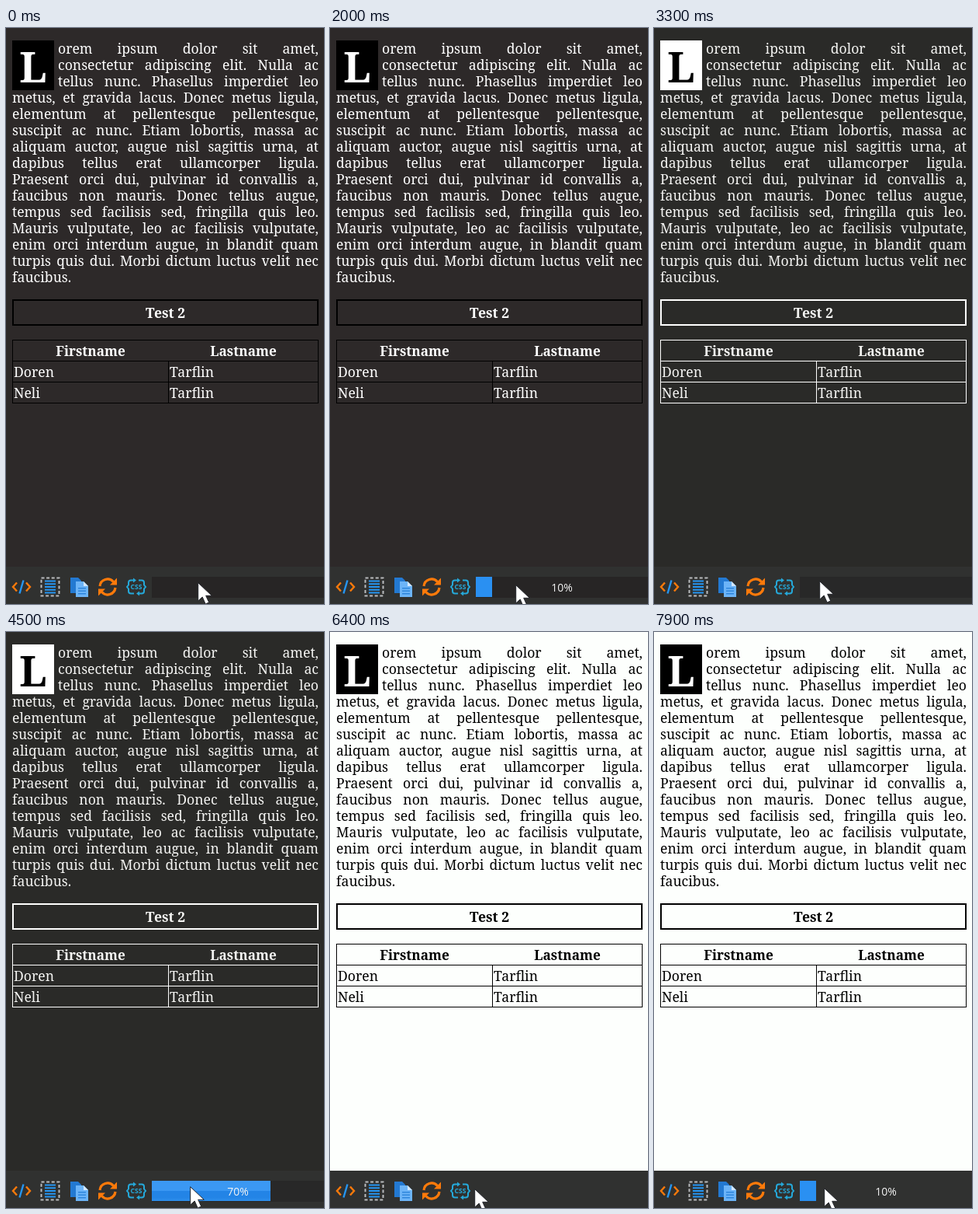
An HTML page that plays this animation: 410x741 px, repeating every 8000 ms.

```html
<!DOCTYPE html>
<html lang="en">
<head>
<meta charset="utf-8">
<title>Style reload</title>
<style>
html, body { margin: 0; width: 100%; height: 100%; overflow: hidden; }
#stage {
  position: relative; width: 410px; height: 741px; overflow: hidden;
  background: var(--bg); color: var(--ink);
  font: 17.6px/21px "Noto Serif", serif;
}
.dark  { --bg: #2d2929; --ink: #fff; --line: #000; --cap: #000; --capInk: #fff; --trough: #272525; }
.slate { --bg: #2a2a28; --ink: #f4f4f2; --line: #fff; --cap: #fff; --capInk: #000; --trough: #282828; }
.light { --bg: #fdfffd; --ink: #000; --line: #000; --cap: #000; --capInk: #fff; --trough: transparent; }
#stage > * { position: absolute; }
.row { right: 7px; white-space: nowrap; text-align: justify; text-align-last: justify; }
.row:last-of-type { text-align-last: left; }
.cap {
  left: 8px; top: 16px; width: 54px; height: 64px;
  background: var(--cap); color: var(--capInk);
  font: bold 54px/66px "Noto Serif", serif; text-align: center;
}
.box { box-sizing: border-box; left: 8px; width: 395px; }
.title {
  top: 349px; height: 34px; border: 2px solid var(--line);
  font-weight: bold; line-height: 31px; text-align: center;
}
.table {
  top: 401px; height: 82px; display: grid;
  grid-template: repeat(3, 26px) / 200px 192px; gap: 1px;
  border: 1px solid var(--line); background: var(--line);
}
.table div { background: var(--bg); padding-left: 1px; line-height: 27px; }
.table .th { padding: 0; font-weight: bold; font-size: 17.2px; text-align: center; }
.table .th:first-child { box-shadow: 1px 0 var(--bg); }
.bar { left: 0; top: 693px; width: 410px; height: 48px; background: #303130; }
.meter { left: 188px; top: 706px; width: 222px; height: 26px; }
.trough { height: 27px; background: var(--trough); }
#fill { background: #2a90f2; }
#fill.big { background: linear-gradient(#3b98f3 0 48%, #2384e6 52% 82%, #2e8feb); }
#label { text-align: center; color: #f4f4f4; font: 14px/27px "Open Sans", sans-serif; }
svg { left: 0; top: 693px; overflow: visible; }
</style>
</head>
<body>
<div id="stage" class="dark">
  <div class="cap">L</div>
  <div class="box title">Test 2</div>
  <div class="box table">
    <div class="th">Firstname</div><div class="th">Lastname</div>
    <div>Doren</div><div>Tarflin</div>
    <div>Neli</div><div>Tarflin</div>
  </div>
  <div class="bar"></div>
  <div class="meter trough"></div>
  <div class="meter" id="fill"></div>
  <div class="meter" id="label"></div>
  <svg width="410" height="48" fill="none">
    <g transform="translate(20 26)" stroke="#ff7a0a" stroke-width="2.4">
      <path id="angle" d="M-6-5.500L-11 0l5 5.500"/>
      <use href="#angle" transform="scale(-1 1)"/>
      <path d="M2.500-8.500l-5 17" stroke="#2596f3"/>
    </g>
    <g transform="translate(57 26)">
      <rect x="-11.500" y="-11.500" width="23" height="23" stroke="#b9bcbe" stroke-width="2" stroke-dasharray="4 2.600"/>
      <path d="M0-8.500v17" stroke="#2596f3" stroke-width="14" stroke-dasharray="2 1.750"/>
    </g>
    <g transform="translate(83 14)">
      <path d="M0 0h10l4 4v16h-14z" fill="#2379d2"/>
      <path d="M7 5h10l6 6v14h-16z" fill="#6cb4f8"/>
      <path d="M17 5v6h6z" fill="#d3e8fd"/>
      <path d="M15 13v9" stroke="#2e86dc" stroke-width="10" stroke-dasharray="1.500 2"/>
    </g>
    <g transform="translate(131 26)">
      <g id="turn">
        <path d="M-10-1A10 10 0 0 1 7.500-6.500" stroke="#ff7a0a" stroke-width="3.200"/>
        <path d="M12-11.500v9h-9z" fill="#ff7a0a"/>
      </g>
      <use href="#turn" transform="rotate(180)"/>
    </g>
    <g transform="translate(168 26)">
      <g id="brace">
        <path d="M-3-8.500h-4q-3 0-3 3v3l-2 2.500l2 2.500v3q0 3 3 3h4" stroke="#25a9da" stroke-width="2"/>
        <path d="M-4-11.500l4 3l-4 3z" fill="#25a9da"/>
      </g>
      <use href="#brace" transform="rotate(180)"/>
      <text y="3" text-anchor="middle" fill="#25a9da" font-family="Open Sans, sans-serif" font-size="8.500" font-weight="700">CSS</text>
    </g>
  </svg>
  <svg id="cursor" style="top:0" width="20" height="30">
    <path d="M.7 .7V24l5.500-5l4 9l4.500-2l-4-8.700h7.600z" fill="#fff" stroke="#23252b"/>
  </svg>
</div>
<script>
const LOOP = 8000, STEP = 100;
const $ = id => document.getElementById(id);
const stage = $('stage'), fill = $('fill'), label = $('label'), cursor = $('cursor');

const lines = `orem ipsum dolor sit amet,
consectetur adipiscing elit. Nulla ac
tellus nunc. Phasellus imperdiet leo
metus, et gravida lacus. Donec metus ligula,
elementum at pellentesque pellentesque,
suscipit ac nunc. Etiam lobortis, massa ac
aliquam auctor, augue nisl sagittis urna, at
dapibus tellus erat ullamcorper ligula.
Praesent orci dui, pulvinar id convallis a,
faucibus non mauris. Donec tellus augue,
tempus sed facilisis sed, fringilla quis leo.
Mauris vulputate, leo ac facilisis vulputate,
enim orci interdum augue, in blandit quam
turpis quis dui. Morbi dictum luctus velit nec
faucibus.`.split('\n');

lines.forEach((text, i) => {
  const row = document.createElement('div');
  row.className = 'row';
  row.textContent = text;
  row.style.left = (i < 3 ? 67 : 8) + 'px';
  row.style.top = 16 + i * 21 + 'px';
  stage.append(row);
});
stage.append(cursor);

// A click starts the meter; a reload swaps the theme and clears it
const phases = [
  { from: 0, theme: 'dark', click: 1300 },
  { from: 2500, theme: 'slate', click: 4100, surge: 4500 },
  { from: 5100, theme: 'light', click: 7400 }
];

// Pointer glides: start, end, destination
const home = [247, 713];
const glides = [
  [200, 800, 161, 716],
  [1650, 2000, 239, 716],
  [3200, 3700, 166, 703],
  [4300, 4500, 237, 713],
  [5000, 5100, 232, 718],
  [5900, 6800, 175, 715],
  [6900, 7200, 165, 715],
  [7700, 7900, 219, 715]
];
const easeOut = k => 1 - (1 - k) ** 2;

function pointer(t) {
  let [x, y] = home;
  for (const [from, to, tx, ty] of glides) {
    const k = easeOut(Math.min(1, Math.max(0, (t - from) / (to - from))));
    x += (tx - x) * k;
    y += (ty - y) * k;
  }
  return [Math.round(x), Math.round(y)];
}

function draw(t) {
  const { theme, click, surge } = phases.findLast(p => p.from <= t);
  const pct = t >= surge ? 70 : t >= click ? 10 : 0;
  stage.className = theme;
  fill.style.width = Math.max(0, pct * 2.2 - 1) + 'px';
  fill.className = pct > 50 ? 'meter big' : 'meter';
  label.textContent = pct ? pct + '%' : '';
  const [x, y] = pointer(t);
  cursor.style.transform = `translate(${x}px, ${y}px)`;
}

const start = performance.now();
function tick() {
  const t = (performance.now() - start) % LOOP;
  draw(Math.floor(t / STEP) * STEP);
  requestAnimationFrame(tick);
}
tick();
</script>
</body>
</html>
```
